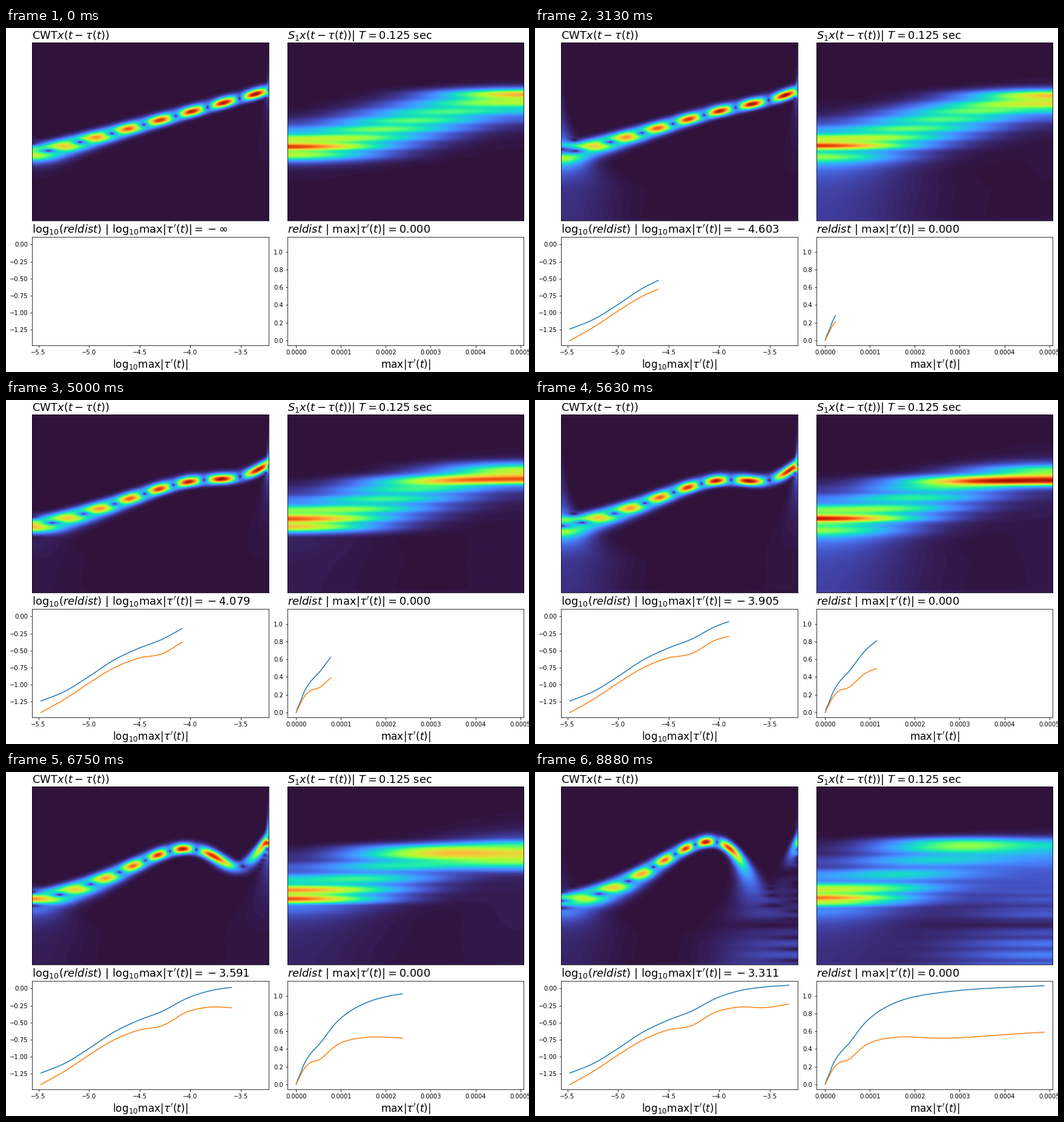
These frames come from a looping animation (864 px wide and 568 px high, 9010 ms). A matplotlib script:

```python
import numpy as np
import matplotlib.pyplot as plt
from matplotlib.animation import FuncAnimation

W, H, DPI = 864, 568, 72
TICKS, TICK_MS = 170, 53        # one loop lasts 9010 ms
STEP_MS = 125                   # the picture advances eight times a second
STEPS = 63                      # warp strengths after the unwarped start

# --- signal and transform settings (time runs over one second) ---
N, HOP, ROWS = 2048, 4, 147
F_LOW, OCTAVES, F_AM = 31.0, 2.81, 3.71
PX_PER_OCT, Y_LOW, PANEL_H = 38.0, 186.6, 294.0
REL_BW, KNEE, SMOOTH = 0.088, 11.4, 0.22
TAU_AMP = 0.0916

log_slope = -3.3113 + 0.0349 * np.arange(1 - STEPS, 1)
slope = 10 ** log_slope

# filter bank: logarithmic spacing, linear with fixed bandwidth below the knee
rows_y = (np.arange(ROWS) + 0.5) * PANEL_H / ROWS
centers = F_LOW * 2 ** ((Y_LOW - rows_y) / PX_PER_OCT)
centers = np.where(centers > KNEE, centers, KNEE * (1 + np.log(centers / KNEE)))
widths = REL_BW * np.maximum(centers, KNEE)

t = (np.arange(N) + 0.5) / N
freqs = np.arange(N) / 2
bank = 2 * np.exp(-0.5 * ((freqs - centers[:, None]) / widths[:, None]) ** 2)
cols = 2 * N // HOP
lowpass = np.exp(-2 * (np.pi * SMOOTH * np.arange(cols // 2 + 1) / 2) ** 2)


def warped_chirp(strength):
    s = t - strength * TAU_AMP * np.cos(2 * np.pi * t ** 2)
    rate = OCTAVES * np.log(2)
    phase = 2 * np.pi * F_LOW * np.expm1(rate * s) / rate
    return np.cos(2 * np.pi * F_AM * s) * np.cos(phase)


def transform(strength):
    """Scalogram and its time average, with mirrored edges."""
    x = warped_chirp(strength)
    spec = np.fft.fft(np.concatenate([x, x[::-1]]))[:N]
    folded = (bank * spec).reshape(ROWS, -1, cols).sum(axis=1)
    mag = np.abs(np.fft.ifft(folded, axis=1)) / HOP
    avg = np.fft.irfft(np.fft.rfft(mag, axis=1) * lowpass, n=cols, axis=1)
    half = cols // 2
    return mag[:, :half].astype("f4"), avg[:, :half].astype("f4")


strengths = np.concatenate([[0], slope / slope[-1]])
scalograms, averages = zip(*(transform(a) for a in strengths))


def curve(*knots):
    """Smooth cubic through evenly spaced heights."""
    y = np.array(knots)
    m = np.gradient(y)
    pos = np.linspace(0, len(y) - 1, STEPS)
    i = np.minimum(pos.astype(int), len(y) - 2)
    u = pos - i
    rise = y[i + 1] - y[i]
    bend = (1 - u) * (m[i] - rise) - u * (m[i + 1] - rise)
    return y[i] + u * rise + u * (1 - u) * bend


def with_zero(values):
    return np.concatenate([[0], values])


log_curves = [
    curve(-1.241, -1.095, -0.875, -0.64, -0.47, -0.333, -0.145, -0.03, 0.022, 0.047),
    curve(-1.41, -1.208, -0.972, -0.755, -0.613, -0.545, -0.345, -0.272, -0.281, -0.229),
]
lin_curves = [with_zero(10 ** y) for y in log_curves]
lin_x = with_zero(slope)

# --- figure ---
fig = plt.figure(figsize=(W / DPI, H / DPI), dpi=DPI, facecolor="white")
LEFT, RIGHT = (43.2, 433.7), (464.9, 855.4)
TOP, BOTTOM = (23.7, 317.8), (345.2, 524.2)


def panel(xs, ys):
    return fig.add_axes([xs[0] / W, 1 - ys[1] / H,
                         (xs[1] - xs[0]) / W, (ys[1] - ys[0]) / H])


def title(ax, text):
    return ax.set_title(text, loc="left", fontsize=18)


def heatmap(xs, stack, text):
    ax = panel(xs, TOP)
    im = ax.imshow(stack[0], cmap="turbo", aspect="auto", interpolation="bilinear",
                   vmin=0, vmax=1.03 * max(a.max() for a in stack))
    ax.set_xticks([])
    ax.set_yticks([])
    title(ax, text)
    return im


def chart(xs, x, ylim, xticks, yticks, label):
    ax = panel(xs, BOTTOM)
    ax.set_xticks(xticks)
    ax.set_yticks(yticks)
    pad = 0.04 * (x[-1] - x[0])
    ax.set_xlim(x[0] - pad, x[-1] + pad)
    ax.set_ylim(ylim)
    ax.set_xlabel(label, fontsize=17)
    lines = [ax.plot([], [], color=c, lw=1.5)[0] for c in ("C0", "C1")]
    return lines, title(ax, "")


MAX_TAU = r"\mathrm{max}|\tau'(t)|"
LOG = r"\mathrm{log}_{10}"

cwt_im = heatmap(LEFT, scalograms, r"CWT$x(t-\tau(t))$")
avg_im = heatmap(RIGHT, averages, r"$S_1x(t-\tau(t))$| $T=0.125$ sec")
log_lines, log_title = chart(
    LEFT, log_slope, (-1.482, 0.109), np.arange(-5.5, -3.4, 0.5),
    np.arange(-5, 1) * 0.25, f"${LOG}{MAX_TAU}$")
lin_lines, lin_title = chart(
    RIGHT, lin_x, (-0.056, 1.167), np.arange(6) * 1e-4,
    np.arange(6) * 0.2, f"${MAX_TAU}$")


def update(tick):
    k = ((tick + 1) * TICK_MS - 1) // STEP_MS
    j = min(k + 1, STEPS) if k else 0
    cwt_im.set_data(scalograms[j])
    avg_im.set_data(averages[j])

    for line, y in zip(log_lines, log_curves):
        line.set_data(log_slope[:j], y[:j])
    shown = j + (k >= STEPS)    # this chart trails by one point until the hold
    for line, y in zip(lin_lines, lin_curves):
        line.set_data(lin_x[:shown], y[:shown])

    value = f"{log_slope[j - 1]:.3f}" if j else r"-\infty"
    log_title.set_text(f"${LOG}(reldist)$ | ${LOG}{MAX_TAU}={value}$")
    lin_title.set_text(f"$reldist$ | ${MAX_TAU}={lin_x[j]:.3f}$")
    return [cwt_im, avg_im, *log_lines, *lin_lines, log_title, lin_title]


anim = FuncAnimation(fig, update, frames=TICKS, init_func=lambda: update(0),
                     interval=TICK_MS, repeat=True, blit=False)
plt.show()
```
